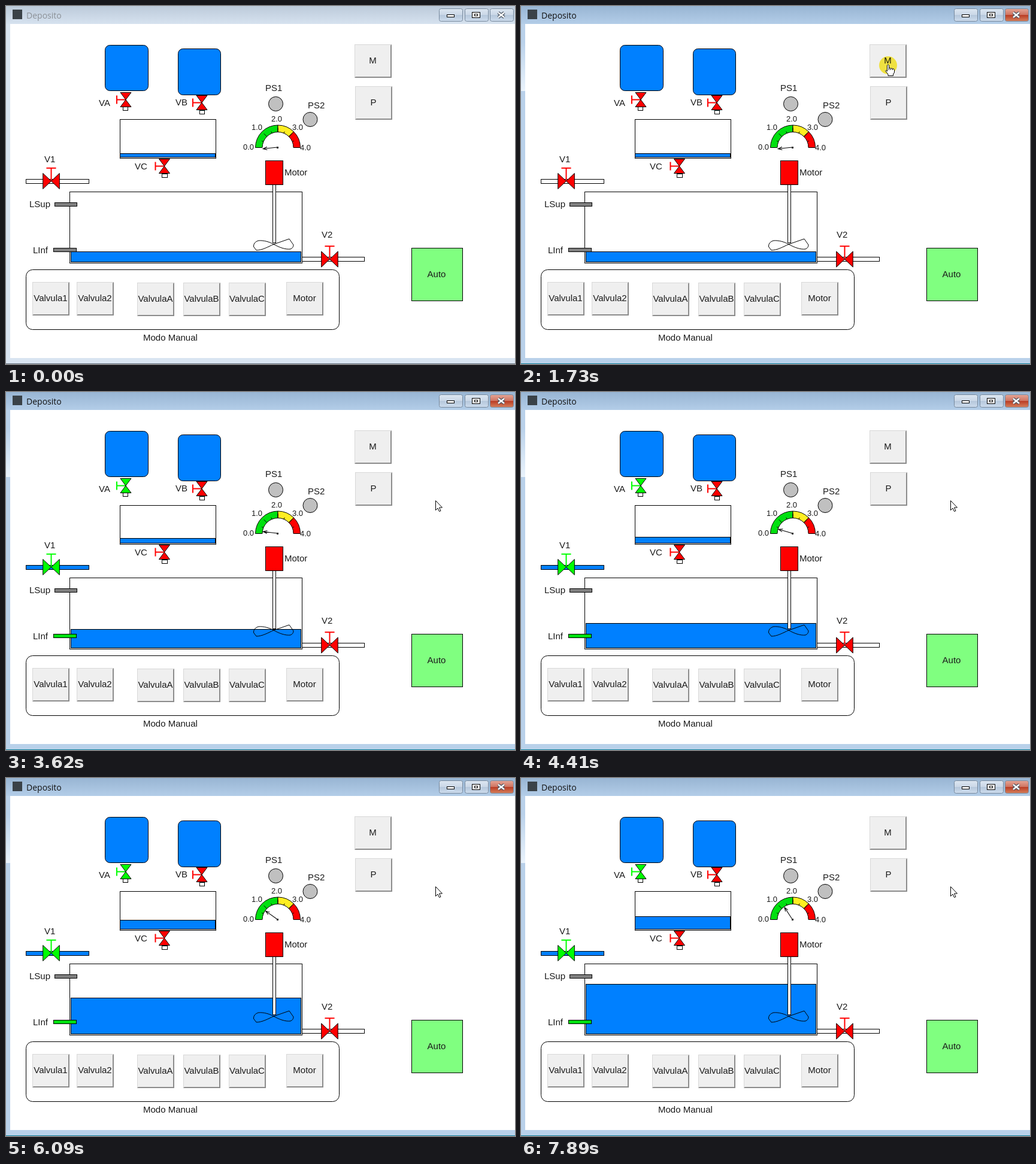
Recreate the animation shown at these times as an HTML page. Size 850 by 598 pixels, loop 8 s.

```html
<!DOCTYPE html>
<html lang="es">
<head>
<meta charset="utf-8">
<title>Deposito</title>
<style>
  html, body { margin: 0; width: 100%; height: 100%; overflow: hidden; background: #fff; }
  svg { display: block; width: 850px; height: 598px; }
  text { font: 15px "Liberation Sans", Arial, sans-serif; fill: #1a1a1a; }
  .scale { font-size: 13px; }
  .title { font: 14px "Open Sans", sans-serif; }
  .mid { text-anchor: middle; }
  .line { stroke: #000; }
  .valve path { vector-effect: non-scaling-stroke; }
  .open { --valve: #00ff00; }
</style>
</head>
<body>
<svg id="stage" viewBox="0 0 850 598" xmlns="http://www.w3.org/2000/svg">
  <defs>
    <linearGradient id="idle" x2="0" y2="1"><stop stop-color="#bccada"/><stop offset="1" stop-color="#d6e2ef"/></linearGradient>
    <linearGradient id="active" x2="0" y2="1"><stop stop-color="#98b5d3"/><stop offset="1" stop-color="#b3cde8"/></linearGradient>
    <linearGradient id="shine" x2="0" y2="1"><stop stop-color="#b9d1ea"/><stop offset="1" stop-color="#eaf3fc"/></linearGradient>
    <linearGradient id="glass" x2="0" y2="1"><stop stop-color="#dce6f1"/><stop offset=".48" stop-color="#cbd8e7"/><stop offset=".5" stop-color="#b5c7db"/><stop offset="1" stop-color="#cddced"/></linearGradient>
    <linearGradient id="red" x2="0" y2="1"><stop stop-color="#e5a596"/><stop offset=".48" stop-color="#cf7562"/><stop offset=".5" stop-color="#b93a22"/><stop offset="1" stop-color="#d6805c"/></linearGradient>
  </defs>
</svg>
<script>
const LOOP = 8000, BLUE = '#0080ff';
const stage = document.getElementById('stage');

function add(tag, attrs, parent = stage) {
  const el = document.createElementNS(stage.namespaceURI, tag);
  set(el, attrs);
  return parent.appendChild(el);
}
function set(el, attrs) {
  for (const key in attrs) el.setAttribute(key, attrs[key]);
}
const rect = (x, y, width, height, fill, more) => add('rect', { x, y, width, height, fill, ...more });
const box = (x, y, w, h, fill, more) => rect(x + .5, y + .5, w, h, fill, { class: 'line', ...more });
const path = (d, fill, more, parent) => add('path', { d, fill, ...more }, parent);
function label(x, y, str, cls = '') {
  const el = add('text', { x, y, class: cls });
  el.textContent = str;
  return el;
}

// window frame
const frame = rect(0, 0, 850, 598);
const titleBar = rect(0, 0, 850, 30);
const sheen = rect(0, 60, 7, 82, 'url(#shine)');
const bottomEdge = rect(0, 597, 850, 1);
rect(7, 30, 843, 558, '#fff');
rect(11, 6, 16, 16, '#3a4248');
const title = label(34, 21, 'Deposito', 'title');
const caption = [723, 766, 808].map(x => box(x, 4, 39, 21, 'url(#glass)', { rx: 3, style: 'stroke:#77899d' }));
const icon = { stroke: '#4b5563' };
box(736, 14, 12, 4, '#fff', icon);
box(778, 10, 13, 9, '#fff', icon);
box(782, 13, 5, 3, '#fff', icon);
const cross = 'M822 11L832 19M832 11L822 19';
path(cross, 'none', { stroke: '#4b5563', 'stroke-width': 5 });
path(cross, 'none', { stroke: '#fff', 'stroke-width': 2.5 });

// feed tanks and mixing tank
box(165, 65, 72, 76, BLUE, { rx: 8 });
box(287, 71, 71, 77, BLUE, { rx: 8 });
box(190, 189, 160, 65, '#fff');
const mix = box(190, 246, 159, 6, BLUE);

function valve(x, y, turn = '') {
  const g = add('g', { class: 'valve', transform: `translate(${x} ${y}) ${turn}` });
  const colour = 'var(--valve, #ff0000)';
  path('M0 0H-15M-15 -7V7', 'none', { style: `stroke:${colour}`, 'stroke-width': 2 }, g);
  path('M-9 -12H9L-9 12H9Z', '', { class: 'line', style: `fill:${colour}` }, g);
  return g;
}
const upright = 'rotate(90) scale(1.45 1.15)';
const valveA = valve(200, 156.5);
valve(327, 161.5);
valve(264.5, 267.5);
box(195, 168, 8, 6, '#fff');
box(323, 174, 8, 6, '#fff');
box(260, 280, 9, 6, '#fff');

// main tank
box(106, 310, 388, 119, '#fff');
const liquid = box(108, 410, 384, 17, BLUE);
const inlet = box(33, 289, 105, 7, '#fff');
const valve1 = valve(75.5, 292.5, upright);
box(494, 419, 104, 7, '#fff');
valve(540.5, 423, upright);
box(81, 328, 37, 6, '#808080');
const lowSensor = box(79, 404, 38, 6, '#808080');
box(433, 258, 29, 40, '#ff0000');
path('M447 398C440 394 430 391 421 392Q413 395 413.500 402L418 408C428 408 438 402 447 398L473 389L480 399Q480 404 475 406C466 407 456 403 447 398', 'none', { class: 'line' });
box(445, 298, 5, 97, '#fff');

// gauge
const polar = (r, deg) => {
  const a = deg * Math.PI / 180;
  return `${(454 - r * Math.cos(a)).toFixed(1)} ${(236.5 - r * Math.sin(a)).toFixed(1)}`;
};
[[0, 90, '#00e010'], [90, 135, '#ffee22'], [135, 180, '#ff0000']].forEach(([from, to, fill]) =>
  path(`M${polar(37.5, from)}A37.5 37.5 0 0 1 ${polar(37.5, to)}L${polar(26, to)}A26 26 0 0 0 ${polar(26, from)}Z`, fill, { class: 'line' }));
for (let deg = 22.5; deg < 180; deg += 22.5) path(`M${polar(26, deg)}L${polar(deg % 45 ? 29 : 33, deg)}`, 'none', { class: 'line' });
const needle = path('M453 236H429M436 233.500L429 236L436 238.500', 'none', { class: 'line' });
rect(452, 235, 3, 3, '#222');
[[396, 240, '0.0'], [410, 207, '1.0'], [443, 193, '2.0'], [478, 207, '3.0'], [491, 241, '4.0']]
  .forEach(([x, y, str]) => label(x, y, str, 'scale'));
[[450.5, 163.5], [508, 189.5]].forEach(([cx, cy]) => add('circle', { cx, cy, r: 12, fill: '#c0c0c0', class: 'line' }));

[[155, 167, 'VA'], [283, 166, 'VB'], [215, 273, 'VC'], [433, 142, 'PS1'], [504, 171, 'PS2'], [64, 261, 'V1'],
 [527, 387, 'V2'], [39, 336, 'LSup'], [45, 413, 'LInf'], [465, 283, 'Motor'], [229, 559, 'Modo Manual']]
  .forEach(args => label(...args));

// controls
box(33, 440, 523, 100, 'none', { rx: 11 });
box(677, 404, 85, 88, '#80ff80');
label(719, 453, 'Auto', 'mid');
function button(x, y, str) {
  rect(x, y, 62, 56, '#d8d8d8');
  path(`M${x + 62} ${y}V${y + 56}H${x}L${x + 2} ${y + 54}H${x + 60}V${y + 2}Z`, '#8c8c8c');
  rect(x + 1, y + 1, 59, 53, '#efefef');
  label(x + 30.5, y + 32, str, 'mid');
}
[[582, 64, 'M'], [583, 134, 'P'], [44, 461, 'Valvula1'], [118, 461, 'Valvula2'], [219, 462, 'ValvulaA'],
 [296, 462, 'ValvulaB'], [372, 462, 'ValvulaC'], [468, 461, 'Motor']].forEach(args => button(...args));

// pointer
const glow = add('circle', { cx: 613, cy: 99, r: 15, fill: '#fff045', style: 'mix-blend-mode:multiply' });
const pointer = add('g', {});
const arrow = path('M.5 .5V16.500L4 13L6.500 18.500L9 17.500L6.500 12H11.500Z', '#fff', { class: 'line' }, pointer);
const hand = path('M-1.500 11V1Q0 -1.500 1.500 1V6Q3 4.500 4.500 6.500Q6 5 7.500 7Q9.500 6 10.500 8.500V13L8.500 16V18.500H0V16L-4.500 10.500Q-4 8 -1.500 11M1.500 6V9M4.500 6.500V9M7.500 7V9', '#fff', { class: 'line' }, pointer);

const route = [[390, 824, 460], [590, 765, 350], [790, 670, 225], [930, 608, 152], [1140, 613, 98],
               [1900, 613, 98], [2200, 655, 122], [2420, 700, 165], [2620, 717, 181]];
function pointerAt(t) {
  const next = route.findIndex(p => p[0] > t);
  if (next < 0) return route[route.length - 1].slice(1);
  const [t0, x0, y0] = route[next - 1], [t1, x1, y1] = route[next];
  const f = (t - t0) / (t1 - t0);
  return [Math.round(x0 + (x1 - x0) * f), Math.round(y0 + (y1 - y0) * f)];
}
const snap = t => t < 1730 ? 390 + Math.floor((t - 390) / 68) * 68 : 1730 + Math.floor((t - 1730) / 89) * 89;
const overButton = (x, y) => x >= 582 && x < 645 && (y >= 64 && y < 121 || y >= 134 && y < 191);
const show = (el, on) => el.setAttribute('visibility', on ? 'inherit' : 'hidden');

// the process updates about five times a second
function tick(t) {
  return t < 5080 ? Math.min(10, Math.floor((t - 2820) / 198.5)) : 11 + Math.floor((t - 5080) / 200);
}

function render(t) {
  const focused = t >= 1730, running = t >= 2220, k = tick(t);
  set(frame, { fill: focused ? '#b9d1ea' : '#d9e4f1' });
  set(titleBar, { fill: focused ? 'url(#active)' : 'url(#idle)' });
  set(bottomEdge, { fill: focused ? '#10809c' : '#65707c' });
  show(sheen, focused);
  title.style.fill = focused ? '#111' : '#8b9096';
  set(caption[2], { fill: focused ? 'url(#red)' : 'url(#glass)' });

  for (const v of [valveA, valve1]) v.classList.toggle('open', running);
  set(inlet, { fill: running ? BLUE : '#fff' });
  set(lowSensor, { fill: t >= 2820 ? '#00e010' : '#808080' });

  const level = Math.min(410, Math.round(405.7 - 2.45 * k));
  set(liquid, { y: level + .5, height: 427 - level });
  const mixLevel = Math.min(246, Math.round(246.4 - .61 * k));
  set(mix, { y: mixLevel + .5, height: 252 - mixLevel });
  set(needle, { transform: `rotate(${Math.max(-6, 2.4 * k - 3)} 453 236)` });

  show(glow, t >= 1730 && t < 1910);
  show(pointer, t >= 390);
  if (t >= 390) {
    const [x, y] = pointerAt(snap(t)), over = overButton(x, y);
    set(pointer, { transform: `translate(${x} ${y})` });
    show(hand, over);
    show(arrow, !over);
  }
}

const start = performance.now();
function loop() {
  render((performance.now() - start) % LOOP);
  requestAnimationFrame(loop);
}
loop();
</script>
</body>
</html>
```
